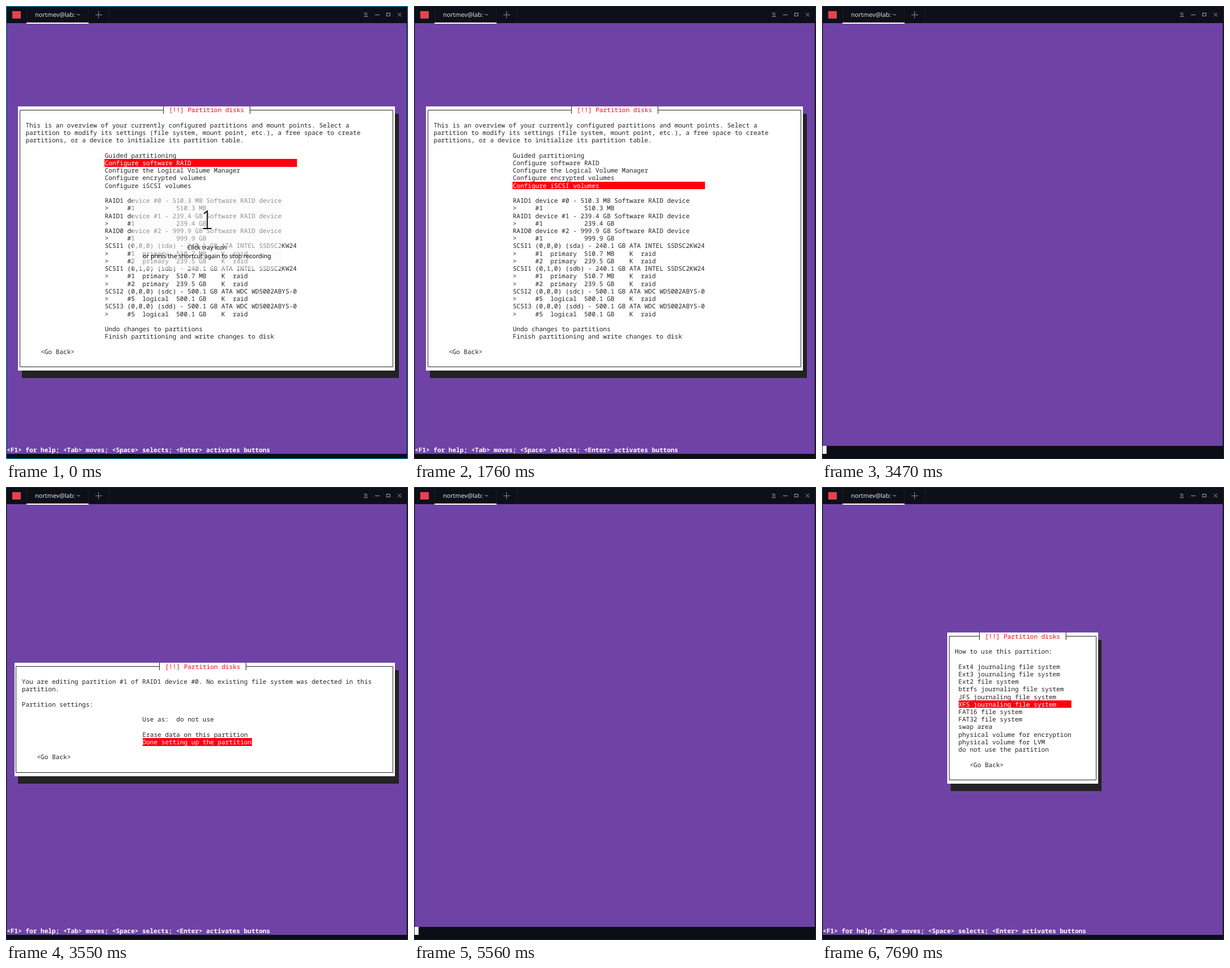
Recreate the animation shown at these times as an HTML page. Size 706 px wide and 794 px high, loop 8 s.

```html
<!DOCTYPE html>
<html lang="en">
<head>
<meta charset="utf-8">
<title>Partition disks</title>
<style>
html, body { margin: 0; width: 100%; height: 100%; overflow: hidden; background: #0e1019; }
svg { display: block; width: 706px; height: 794px; }
text { white-space: pre; text-rendering: geometricPrecision; }
.term text { font: 11.033px "Noto Sans Mono", "DejaVu Sans Mono", monospace; }
.term .help { font-weight: bold; }
.ui { font: 10.73px "Noto Sans", "Open Sans", sans-serif; }
</style>
</head>
<body>
<svg id="stage" viewBox="0 0 706 794" xmlns="http://www.w3.org/2000/svg">
  <rect width="706" height="794" fill="#0b0e16"/>
  <g id="header">
    <rect width="706" height="30" fill="#0d1018"/>
    <path d="M36.5 1V29M144.5 1V29M180.5 1V29" stroke="#171a22"/>
    <rect x="11" y="9" width="15" height="13" fill="#e8414f"/>
    <text class="ui" x="51" y="19" fill="#e2e3e6">nortmev@lab: ~</text>
    <path d="M157 15.5H169M162.5 9V21" stroke="#8b8e94" fill="none"/>
    <g stroke="#a2a5aa" fill="none">
      <path d="M628.5 12.5H634.5M629.5 15.5H635M628.5 18.5H635.5M648 15.5H656"/>
      <rect x="668.5" y="12.5" width="6" height="5"/>
      <path d="M688 12L694.5 18.5M694.5 12L688 18.5"/>
    </g>
  </g>
  <g id="term" class="term"></g>
  <rect x="36" y="29" width="109" height="2" fill="#fff"/>
  <rect id="frame" x=".5" y=".5" width="705" height="793" fill="none"/>
  <g id="countdown">
    <rect x="222" y="330" width="262" height="132" rx="7" fill="#f9f9f9" fill-opacity=".5"/>
    <path d="M347.5 364L353.5 359.5V390M346 390H361" fill="none" stroke="#000" stroke-width="1.9"/>
    <g class="ui" text-anchor="middle">
      <text x="353" y="427">Click tray icon</text>
      <text x="353" y="442">or press the shortcut again to stop recording</text>
    </g>
  </g>
</svg>
<script>
const LOOP = 8000;
const INK = '#232323', RED = '#ff000f', PURPLE = '#6f43a5';
const $ = id => document.getElementById(id);

// Character grid
const colX = c => 1.3 + c * 6.62;
const rowY = r => 30 + r * 13.24;

const raid = (level, n, size) => [
  `RAID${level} device #${n} - ${size} Software RAID device`,
  `>     #1           ${size}`
];
const part = (n, kind, size) => `>     #${n}  ${kind}  ${size}    K  raid`;
const disk = (bus, addr, dev, size, model) => `SCSI${bus} (${addr}) (${dev}) - ${size} GB ATA ${model}`;
const ssdParts = [part(1, 'primary', '510.7 MB'), part(2, 'primary', '239.5 GB')];
const hddPart = part(5, 'logical', '500.1 GB');

// box: left, top, right, bottom in cells; title, list and back: column and row
const overview = {
  box: [3, 11, 103, 46], title: 43, back: [9, 43],
  notes: [
    [5, 13, 'This is an overview of your currently configured partitions and mount points. Select a'],
    [5, 14, 'partition to modify its settings (file system, mount point, etc.), a free space to create'],
    [5, 15, 'partitions, or a device to initialize its partition table.']
  ],
  list: [26, 17], width: 51,
  items: [
    'Guided partitioning',
    'Configure software RAID',
    'Configure the Logical Volume Manager',
    'Configure encrypted volumes',
    'Configure iSCSI volumes',
    '',
    ...raid(1, 0, '510.3 MB'),
    ...raid(1, 1, '239.4 GB'),
    ...raid(0, 2, '999.9 GB'),
    disk(1, '0,0,0', 'sda', '240.1', 'INTEL SSDSC2KW24'), ...ssdParts,
    disk(1, '0,1,0', 'sdb', '240.1', 'INTEL SSDSC2KW24'), ...ssdParts,
    disk(2, '0,0,0', 'sdc', '500.1', 'WDC WD5002ABYS-0'), hddPart,
    disk(3, '0,0,0', 'sdd', '500.1', 'WDC WD5002ABYS-0'), hddPart,
    '',
    'Undo changes to partitions',
    'Finish partitioning and write changes to disk'
  ]
};

const settings = {
  box: [2, 21, 103, 36], title: 42, back: [8, 33],
  notes: [
    [4, 23, 'You are editing partition #1 of RAID1 device #0. No existing file system was detected in this'],
    [4, 24, 'partition.'],
    [4, 26, 'Partition settings:']
  ],
  list: [36, 28], width: 29,
  items: ['Use as:  do not use', '', 'Erase data on this partition', 'Done setting up the partition']
};

const usage = {
  box: [33, 17, 73, 37], title: 43, back: [39, 34],
  notes: [[35, 19, 'How to use this partition:']],
  list: [36, 21], width: 30,
  items: [
    ...['Ext4 journaling', 'Ext3 journaling', 'Ext2', 'btrfs journaling', 'JFS journaling',
      'XFS journaling', 'FAT16', 'FAT32'].map(s => s + ' file system'),
    'swap area',
    'physical volume for encryption',
    'physical volume for LVM',
    'do not use the partition'
  ]
};

// start time, dialog (null = cleared screen), selected item
const steps = [
  [0, overview, 1], [1180, overview, 2], [1490, overview, 3], [1760, overview, 4],
  [2080, overview, 5], [2390, overview, 6], [2820, overview, 7],
  [3470, null],
  [3550, settings, 3], [4500, settings, 2], [4870, settings, 1], [5130, settings, 0],
  [5560, null],
  [5670, usage, 11], [6210, usage, 10], [6510, usage, 9], [6870, usage, 8],
  [7170, usage, 7], [7410, usage, 6], [7690, usage, 5]
];

const escape = s => s.replace(/&/g, '&amp;').replace(/</g, '&lt;').replace(/>/g, '&gt;');

function put(c, r, s, fill = INK, cls = '') {
  return `<text class="${cls}" x="${colX(c)}" y="${rowY(r) + 10.5}" fill="${fill}">${escape(s)}</text>`;
}

function cells(l, t, r, b, fill) {
  const [x, y, x2, y2] = [colX(l), rowY(t), colX(r), rowY(b)].map(Math.round);
  return `<rect x="${x}" y="${y}" width="${x2 - x}" height="${y2 - y}" fill="${fill}"/>`;
}

function border([l, t, r, b], title) {
  const midX = c => Math.floor(colX(c + .5)) + .5;
  const midY = n => Math.floor(rowY(n + .5)) + .5;
  const x = midX(l), x2 = midX(r - 1), y = midY(t), y2 = midY(b - 1);
  const a = midX(title - 2), z = midX(title + 21);
  const top = Math.round(rowY(t)), low = Math.round(rowY(t + 1));
  return `<path d="M${a} ${y}H${x}V${y2}H${x2}V${y}H${z}M${a} ${top}V${low}M${z} ${top}V${low}"
    fill="none" stroke="${INK}"/>`;
}

function dialog(d, selected) {
  const [l, t, r, b] = d.box;
  const [c, first] = d.list;
  const row = first + selected;
  return cells(l + 1, t + 1, r + 1, b + 1, INK)
    + cells(l, t, r, b, '#fff')
    + border(d.box, d.title)
    + put(d.title, t, '[!!] Partition disks', RED)
    + d.notes.map(n => put(...n)).join('')
    + cells(c, row, c + d.width, row + 1, RED)
    + d.items.map((s, i) => put(c, first + i, s, i === selected ? '#fff' : INK)).join('')
    + put(...d.back, '<Go Back>');
}

function screen(d, selected) {
  const bottom = Math.round(rowY(d ? 57 : 56));
  const back = `<rect x="1.4" y="30" width="702.4" height="${bottom - 30}" fill="${PURPLE}"/>`;
  if (!d) return back + cells(0, 56, 1, 57, '#fffaf4');
  return back + dialog(d, selected)
    + put(0, 56, '<F1> for help; <Tab> moves; <Space> selects; <Enter> activates buttons', '#fff', 'help');
}

let shown = null;

function draw(time) {
  const t = time % LOOP;
  const step = steps.filter(s => s[0] <= t).pop();
  if (step !== shown) {
    $('term').innerHTML = screen(step[1], step[2]);
    shown = step;
  }
  const counting = t < 50;
  $('countdown').setAttribute('visibility', counting ? 'visible' : 'hidden');
  $('frame').setAttribute('stroke', counting ? '#0a9fd0' : '#25282e');
}

const start = performance.now();
function tick() {
  draw(performance.now() - start);
  requestAnimationFrame(tick);
}
draw(0);
requestAnimationFrame(tick);
</script>
</body>
</html>
```
